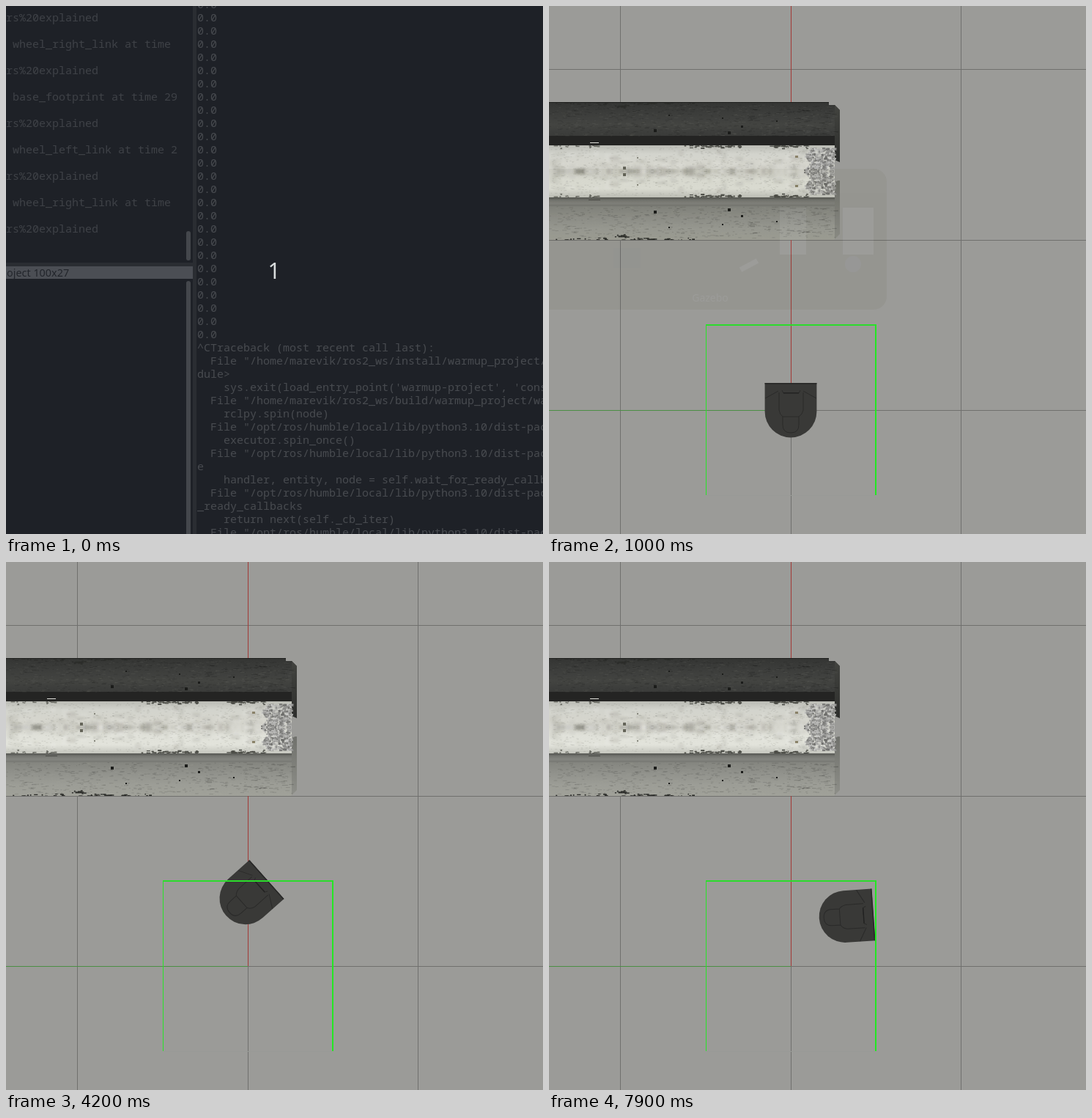
Animation, 733 px wide and 720 px high, one loop 8 s. Source, as an HTML page with a canvas:

```html
<!DOCTYPE html>
<html lang="en">
<head>
<meta charset="utf-8">
<title>Robot square drive</title>
<style>
  html, body { margin: 0; width: 100%; height: 100%; overflow: hidden; background: #9b9b98; }
  #stage { position: relative; width: 733px; height: 720px; overflow: hidden; }
  #stage div, #stage pre, canvas { position: absolute; margin: 0; }
  canvas { left: 0; top: 0; }
  #term, #shade { inset: 0; }
  #term { background: #000; overflow: hidden; }
  pre { top: -12px; font: 15px/18px "Noto Sans Mono", "DejaVu Sans Mono", monospace; white-space: pre; }
  #log { left: 0; width: 245px; overflow: hidden; color: #898986; }
  #trace { left: 261px; color: #b2b2ad; }
  .split { background: #35322f; }
  .bar { left: 246px; width: 6px; border-radius: 3px; background: #a5a5a1; }
  #title { left: 0; top: 355px; width: 255px; height: 17px; background: #c3c3c2; color: #111;
    font: 14.4px/17px "Noto Sans", sans-serif; text-indent: 1px; white-space: nowrap; }
  #shade { background: rgba(39, 43, 51, .77); }
  #count { left: 346px; top: 340px; width: 40px; text-align: center; color: #d9dddd;
    font: 30px/41px "Noto Sans", sans-serif; }
  #popup { left: -30px; top: 222px; width: 491px; height: 192px; border-radius: 18px; background: #3b3a20; }
  #popup div { background: #b4b4b0; }
  #popup .label { left: 200px; top: 166px; width: 100px; text-align: center; background: none;
    color: #a8a8a4; font: 14px/20px "Noto Sans", sans-serif; }
</style>
</head>
<body>
<div id="stage">
  <canvas id="scene" width="733" height="720"></canvas>
  <div id="term">
    <pre id="log"></pre>
    <pre id="trace"></pre>
    <div class="split" style="left:0;top:350px;width:255px;height:5px"></div>
    <div class="split" style="left:255px;top:0;width:5px;height:720px"></div>
    <div id="title">oject 100x27</div>
    <div class="bar" style="top:307px;height:40px"></div>
    <div class="bar" style="top:375px;height:360px"></div>
  </div>
  <div id="shade"><div id="count">1</div></div>
  <div id="popup">
    <div style="left:345px;top:53px;width:36px;height:64px"></div>
    <div style="left:431px;top:53px;width:42px;height:64px"></div>
    <div style="left:118px;top:108px;width:37px;height:27px;background:#22241f"></div>
    <div style="left:290px;top:128px;width:26px;height:7px;transform:rotate(-28deg)"></div>
    <div style="left:434px;top:119px;width:22px;height:22px;border-radius:50%;background:#66647a"></div>
    <div class="label">Gazebo</div>
  </div>
</div>
<script>
const LOOP = 8000, STEP = 100, SCENE_AT = 1000, POPUP_AT = 700;
const $ = id => document.getElementById(id);
const ctx = $('scene').getContext('2d');

// time, x, y, heading in degrees clockwise from up
const PATH = [
  [1000, 330, 551, 0], [1360, 330, 551, 0], [1800, 329.6, 504, -1],
  [2100, 329, 471.8, -2], [2240, 328.5, 457.5, -2], [2340, 328.4, 457.4, -2],
  [2700, 328.4, 457.4, 8], [3600, 328.4, 457.4, 33], [4200, 328.4, 457.4, 48.2],
  [5400, 328, 457, 83], [6080, 328.4, 456.5, 107], [6300, 350, 464, 109.6],
  [6500, 371.9, 471.6, 109.6], [6830, 406.3, 483.9, 110], [7080, 406.3, 483.9, 110],
  [7900, 406.1, 483.4, 86]
];

function logText(left, base) {
  const link = 'rs%20explained\n\n wheel_right_link at time\n\n';
  return '\n' + link + `rs%20explained\n\n base_footprint at time ${base}\n\n` +
    `rs%20explained\n\n wheel_left_link at time ${left}\n\n` + link + 'rs%20explained';
}
const LOGS = [logText(2, 29), logText(3, 30)];

const DIST = '  File "/opt/ros/humble/local/lib/python3.10/dist-packages';
$('trace').textContent = '0.0\n'.repeat(26) + [
  '^CTraceback (most recent call last):',
  '  File "/home/marevik/ros2_ws/install/warmup_project/lib',
  'dule>',
  "    sys.exit(load_entry_point('warmup-project', 'console",
  '  File "/home/marevik/ros2_ws/build/warmup_project/warmup',
  '    rclpy.spin(node)',
  DIST,
  '    executor.spin_once()',
  DIST,
  'e',
  '    handler, entity, node = self.wait_for_ready_callbacks',
  DIST,
  '_ready_callbacks',
  '    return next(self._cb_iter)',
  DIST
].join('\n');

function rng(seed) {
  return () => (seed = (seed * 16807) % 2147483647) / 2147483647;
}

function fade(c, y0, y1, ...colors) {
  const g = c.createLinearGradient(0, y0, 0, y1);
  colors.forEach((col, i) => g.addColorStop(i / (colors.length - 1), col));
  return g;
}

function rect(c, color, x, y, w, h) {
  c.fillStyle = color;
  c.fillRect(x, y, w, h);
}

function poly(c, pts) {
  c.beginPath();
  pts.forEach(([x, y]) => c.lineTo(x, y));
}

function drawGrid(c) {
  rect(c, '#9b9b98', 0, 0, 733, 720);
  for (const x of [97, 330, 562]) rect(c, '#70706e', x, 0, 1, 720);
  for (const y of [86, 319, 551]) rect(c, '#70706e', 0, y, 733, 1);
  rect(c, '#a23a37', 330, 0, 1, 551);
  rect(c, '#4b8e45', 0, 551, 330, 1);
}

// The concrete texture repeats upside down around y = 225.5.
function drawWall(c) {
  const rnd = rng(4211);
  const both = (color, x, y, w, h) => {
    rect(c, color, x, y, w, h);
    rect(c, color, x, 451 - y - h, w, h);
  };
  const crumbs = (x0, x1, y, n, color) => {
    for (let i = 0; i < n; i++)
      both(color, x0 + rnd() * (x1 - x0), y + rnd() * rnd() * 4, 1 + rnd() * 5, 1 + rnd());
  };
  const grain = (n, color, y, h, size) => {
    for (let i = 0; i < n; i++)
      both(color, rnd() * 390, y + rnd() * h, 1 + rnd() * size, 1);
  };

  c.save();
  poly(c, [[0, 131], [382, 131], [382, 135], [390, 135], [397, 142], [397, 213], [390, 210],
    [390, 240], [397, 237], [397, 311], [389, 319], [0, 319]]);
  c.clip();

  rect(c, fade(c, 131, 177, '#343533', '#3c3d3b', '#434441', '#3a3b39'), 0, 131, 397, 46);
  rect(c, '#242423', 0, 177, 397, 13);
  rect(c, fade(c, 190, 261, '#babbb4', '#d3d4cd', '#d5d5cd', '#d4d4cc', '#e0e1d9', '#e2e3db', '#c4c5bd'), 0, 190, 390, 71);
  rect(c, fade(c, 261, 273, '#555652', '#767772', '#83847f', '#777873'), 0, 261, 397, 12);
  rect(c, fade(c, 273, 319, '#84857f', '#91928c', '#9c9d96', '#a0a199'), 0, 273, 397, 46);
  rect(c, fade(c, 135, 213, '#42433f', '#2d2e2c'), 390, 135, 7, 78);
  rect(c, fade(c, 238, 319, '#70716c', '#8e8f89'), 390, 238, 7, 81);

  // soft mirrored stains, strongest near the middle
  c.save();
  c.filter = 'blur(1.5px)';
  for (let i = 0; i < 230; i++) {
    const tone = rnd() < .6 ? '90,88,76' : '255,255,248';
    both(`rgba(${tone},${.04 + rnd() * .08})`, rnd() * 345, 225 - rnd() * rnd() * 32, 2 + rnd() * 12, 2 + rnd() * 6);
  }
  c.restore();
  grain(500, 'rgba(90,90,80,.13)', 192, 33, 3);
  grain(500, 'rgba(10,10,8,.12)', 134, 43, 5);
  grain(300, 'rgba(190,190,180,.07)', 134, 43, 5);
  for (let i = 0; i < 45; i++)
    both('rgba(10,10,8,.18)', 270 + rnd() * 120, 140 + rnd() * 36, 2 + rnd() * 7, 1);

  // rough end of the bright face
  for (let i = 0; i < 430; i++) {
    const v = 105 + rnd() * 100 | 0, y = 193 + rnd() * 32;
    const start = 347 + Math.abs((y - 193) % 20 - 10);
    both(`rgb(${v},${v},${v - 2})`, start + rnd() * (389 - start), y, 1.5 + rnd() * 2.5, 1 + rnd() * 2);
  }

  crumbs(0, 70, 190, 14, '#6a6b64');
  crumbs(182, 262, 190, 42, '#50514b');
  crumbs(298, 352, 190, 32, '#4c4d47');
  crumbs(0, 200, 131, 45, '#2c2d2a');
  crumbs(88, 106, 135, 10, '#2c2d2a');
  for (const [x, y, s] of [[143, 168, 4], [244, 171, 4], [262, 163, 3], [236, 152, 2], [163, 148, 2], [310, 156, 2]])
    both('#1b1c1a', x, y, s, s);
  both('#65655a', 101, 219, 4, 4);
  both('#8a8269', 336, 204, 4, 3);
  both('#85857b', 120, 206, 2, 2);
  rect(c, '#1d1e1c', 0, 131, 382, 1);
  rect(c, '#e0e0db', 56, 186, 12, 1);
  rect(c, '#4b4c48', 54, 264, 16, 1);
  c.restore();
}

function robotShape(c) {
  c.beginPath();
  c.moveTo(-35.4, -37);
  c.lineTo(35.4, -37);
  c.lineTo(35.4, 2);
  c.arc(0, 2, 35.4, 0, Math.PI);
  c.closePath();
}

const DETAILS = new Path2D(
  'M-35-16L-17-26M35-16L17-26M-12-27L-10-23H11L13-27' +
  'M-16-24V0Q-15 6-11 9H11Q16 6 17 0V-24' +
  'M-11 9L-11 20Q-11 31 0 31Q11 31 11 20V9');

function drawRobot([x, y, deg]) {
  ctx.save();
  ctx.translate(x, y);
  ctx.rotate(deg * Math.PI / 180);
  robotShape(ctx);
  ctx.fillStyle = '#393937';
  ctx.fill();
  ctx.save();
  ctx.clip();
  rect(ctx, '#282827', -36, -37, 72, 1.6);
  ctx.strokeStyle = '#2a2a29';
  ctx.lineWidth = 1;
  ctx.stroke(DETAILS);
  rect(ctx, '#212120', -10, -24, 21, 1.2);
  ctx.restore();
  ctx.restore();
}

function drawSquare() {
  rect(ctx, '#989a96', 215, 667, 230, 1);
  rect(ctx, '#2cdc2c', 214, 434, 233, 2);
  rect(ctx, '#29e329', 214, 434, 1, 233);
  rect(ctx, '#22e822', 445, 434, 2, 233);
}

function poseAt(t) {
  const i = Math.max(1, PATH.findIndex(p => p[0] >= t));
  const [a, b] = [PATH[i - 1], PATH[i]];
  const k = (t - a[0]) / (b[0] - a[0]);
  return [1, 2, 3].map(n => a[n] + (b[n] - a[n]) * k);
}

const backdrop = document.createElement('canvas');
backdrop.width = 733;
backdrop.height = 720;
drawGrid(backdrop.getContext('2d'));
drawWall(backdrop.getContext('2d'));

function render(t) {
  const inTerm = t < SCENE_AT;
  $('term').style.display = inTerm ? 'block' : 'none';
  $('shade').style.display = t < STEP ? 'block' : 'none';
  $('popup').style.opacity = t < POPUP_AT || t > SCENE_AT ? 0 : inTerm ? .95 : .055;
  $('log').textContent = LOGS[t < STEP ? 0 : 1];
  if (inTerm) return;
  ctx.drawImage(backdrop, 0, 0);
  drawRobot(poseAt(t));
  drawSquare();
}

const start = performance.now();
let shown = -1;
function tick() {
  const t = Math.floor((performance.now() - start) % LOOP / STEP) * STEP;
  if (t !== shown) render(shown = t);
  requestAnimationFrame(tick);
}
tick();
</script>
</body>
</html>
```
